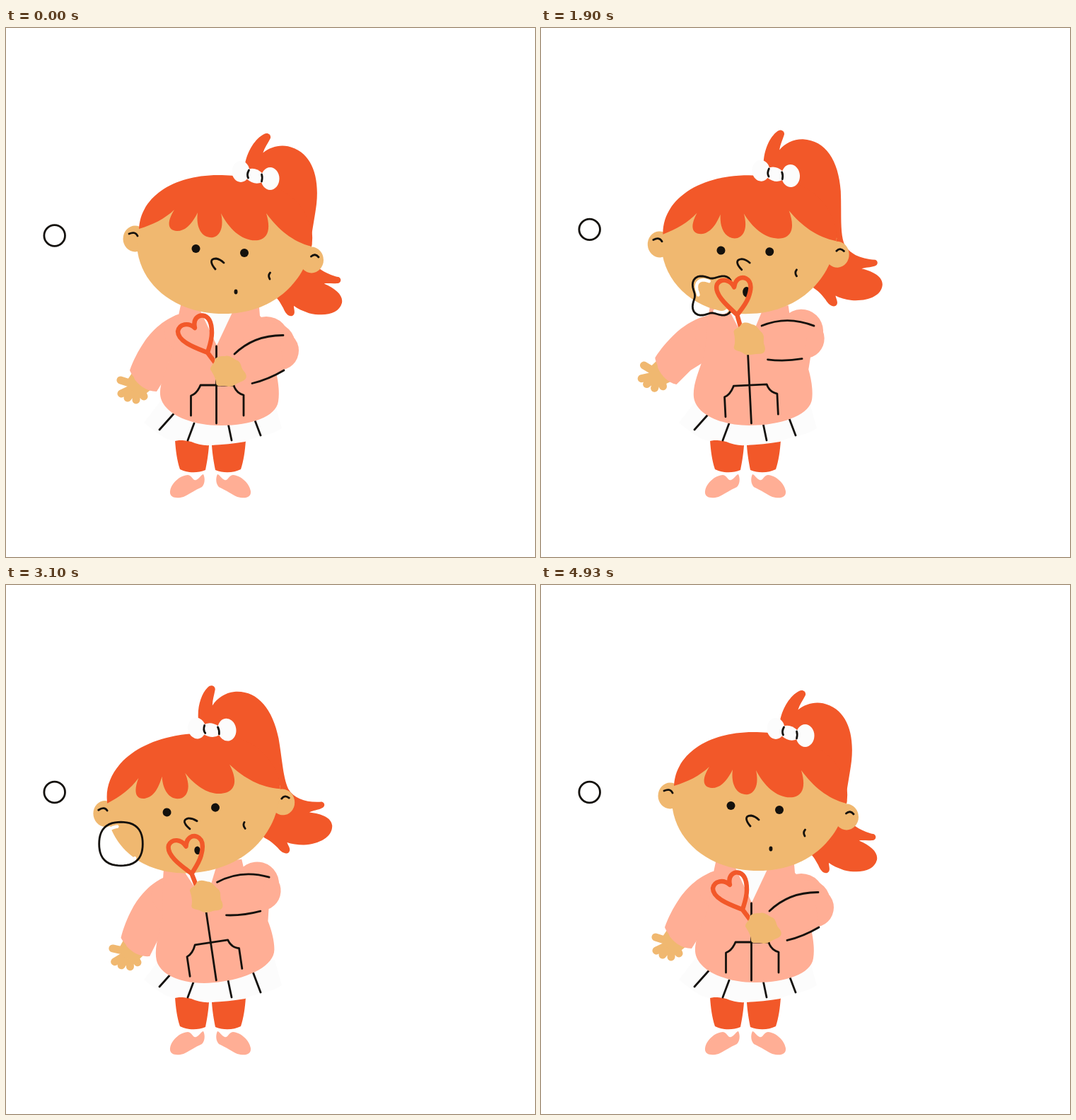
Animation of 748 by 748 pixels, one loop 5010 ms. Source, as an HTML page:

```html
<!DOCTYPE html>
<html lang="en">
<head>
<meta charset="utf-8">
<title>Girl blowing bubbles</title>
<style>
  html, body { margin: 0; width: 100%; height: 100%; overflow: hidden; background: #fff; }
  svg { display: block; width: 100%; height: 100%; }
  .hair { fill: #f25829; }
  .skin { fill: #f0b870; }
  .pink { fill: #ffae95; }
  .pale { fill: #fcfcfc; }
  .ink { fill: #14110d; }
  .line, .finger, .wand, .shine { fill: none; stroke-linecap: round; stroke-linejoin: round; }
  .line { stroke: #14110d; stroke-width: 2.8; }
  .finger { stroke: #f0b870; stroke-width: 11; }
  .wand { stroke: #f25829; stroke-width: 6.4; }
  .shine { stroke: #fff; stroke-width: 4.6; }
</style>
</head>
<body>
<svg viewBox="0 0 748 748">
  <circle id="dot" class="line" cx="68.7" r="14.8"/>

  <g id="leg">
    <path class="hair" d="M239 583C255 582 272 587 287 590C286 604 284 615 282 625C270 630 256 629 246 624C242 612 240 598 239 583Z"/>
    <path class="pink" d="M232 655C234 643 246 633 257 632C264 633 264 641 269 639C274 637 275 632 279 631C282 637 281 645 277 649C266 654 258 660 251 663C240 666 231 664 232 655Z"/>
  </g>
  <use href="#leg" transform="matrix(-1 0 0 1 578 0)"/>
  <path class="pale" d="M218 528L195 558C215 575 228 583 239 584Q252 581 262 585Q275 591 289 590Q315 589 338 585C352 577 372 578 390 566L380 530Z"/>
  <path class="line" d="M238 544.5L217 568M266 559L257 583M314 559L319 583M349 547L360 576"/>

  <path id="pony" class="hair" d="M313 192C313 172 321 154 331 146C337 141 343 146 341 151C339 158 336 164 335 172C343 162 355 156 368 156C400 157 419 185 423 228C425 256 423 284 429 301C436 316 452 323 474 324C479 326 478 332 473 333C468 335 460 335 455 337C473 341 485 348 485 359C484 375 465 383 442 382C433 381 425 379 419 376C420 381 424 386 420 390C416 393 410 390 405 382C398 373 394 370 388 366L350 320L313 230Z"/>

  <g id="body">
    <g id="arm">
      <path class="finger" d="M184 505L162 498M184 507L163 517M184 507L172 523M185 507L184 526M188 505L195 521"/>
      <path class="skin" d="M178 488L204 512L194 520L176 512L170 500Z"/>
      <path class="pink" d="M250 404C225 408 205 430 196 443C186 458 180 470 175 484C177 490 181 492 182 497C190 507 200 514 213 514L228 490L268 450Z"/>
    </g>
    <circle class="pink" cx="250" cy="430" r="26"/>
    <path class="pink" d="M247 392L358 395L359 407L392 440L382 487C385 500 387 515 385 528C382 550 345 562 305 562C262 563 220 545 218 518C217 500 228 480 236 458L244 406Z"/>
    <circle class="pink" cx="368" cy="441" r="33"/>
    <path class="pale" d="M274 398L322 398L298 449Z"/>
    <path class="line" d="M297.5 450V559M261.5 548V520Q270 517 275 505H322Q325 516 336 519V548"/>
  </g>

  <g id="head">
    <ellipse class="skin" cx="182.5" cy="298" rx="17" ry="18.5"/>
    <ellipse class="skin" cx="432" cy="328" rx="17" ry="18.5"/>
    <path class="skin" d="M187 283C174 345 224 404 308 404C375 404 422 362 433 305L400 250L230 240Z"/>
    <path class="hair" d="M188 284C190 240 235 208 300 208C330 208 345 213 365 218C400 230 420 250 427 272C434 285 434 298 432 309C405 302 385 285 368 262C374 282 372 297 357 300C335 303 316 285 304 262C308 280 304 293 293 296C278 298 268 284 271 261C264 275 255 287 242 287C227 286 228 273 238 257C224 270 208 278 188 284Z"/>
    <g class="ink">
      <circle cx="268.5" cy="312" r="6"/>
      <circle cx="337" cy="318" r="6"/>
      <ellipse id="mouth" cy="373"/>
    </g>
    <path class="line" d="M296 341C290 334 287 326 297 326Q303 327 308 332M373.500 346Q370 350 373 355M174 291Q183 287 186 294M431.500 323Q437 318 442 324"/>
    <g class="pale">
      <ellipse cx="332" cy="203" rx="12.500" ry="15"/>
      <path d="M342 200Q353 196 363 206L362 218Q351 223 340 213Z"/>
      <ellipse cx="373.500" cy="213" rx="13" ry="16"/>
    </g>
    <path class="line" d="M343.500 201Q340 207 342.500 212M361.500 207Q363 211 361.500 217"/>
  </g>

  <g id="bubble">
    <path id="shine" class="shine"/>
    <path id="film" class="line"/>
  </g>

  <g id="fore">
    <circle class="pink" cx="378" cy="448" r="31"/>
    <circle class="pink" cx="386" cy="456" r="28"/>
    <path class="pink" d="M328 462Q350 437 386 432L393 484L347 503L330 494Z"/>
    <path class="line" d="M323 461Q351 434 392 434.500M348 502.500Q371 497 393 484"/>
    <path class="wand" d="M297 475L285 459C270 453 243 444 243 429C245 418 258 416 267 424C264 411 272 406 278 406.500C290 408 291 424 291 431C291 442 287 452 285 459"/>
    <path class="skin" d="M289 483C288 478 296 474 295 469C299 463 306 464 310 464C316 462 321 468 327 470C334 474 331 480 337 486C341 491 341 496 335 499C326 502 321 508 314 507C306 504 299 509 297 503C297 496 293 489 289 483Z"/>
  </g>
</svg>

<script>
const $ = id => document.getElementById(id);
const LOOP = 5010;

// Eases through [step, value] pairs; one step is about 50 ms.
const track = (...keys) => t => {
  const k = keys.findIndex(key => key[0] > t);
  if (k === 0) return keys[0][1];
  if (k < 0) return keys[keys.length - 1][1];
  const [t0, a] = keys[k - 1], [t1, b] = keys[k];
  return a + (b - a) * (1 - Math.cos(Math.PI * (t - t0) / (t1 - t0))) / 2;
};

// Lean back to breathe in, lean forward to blow, then stand up again.
const sway = track([2, 0], [21, 33], [50, -41], [66, -41], [96, 0]);
const armTurn = track([2, 0], [24, 26], [54, -3], [70, -8], [96, 0]);
const foreTurn = track([2, 0], [24, 25], [50, 18], [100, 0]);
const lipShift = track([2, 0], [38, -24], [68, -24], [100, 0]);
const lipSize = track([2, 2.5], [26, 8], [44, 4.8], [80, 4], [98, 2.5]);
const dotY = track([0, 293.5], [28, 281], [54, 293]);

// The bubble grows out of the wand from BLOW to FREE, then drifts off.
const BLOW = 22, FREE = 54, GONE = 95;
const driftX = track([FREE, 199], [70, 126], [GONE, 119]);
const driftY = track([FREE, 371], [70, 361], [GONE, 343]);
const shrink = track([FREE, 37.5], [70, 26], [GONE, 23.5]);

const turn = (deg, x, y) => `rotate(${deg} ${x} ${y})`;

function set(id, attrs) {
  for (const name in attrs) $(id).setAttribute(name, attrs[name]);
}

function drawBubble(t) {
  const shown = t > BLOW && t < GONE;
  $("bubble").style.display = shown ? "" : "none";
  if (!shown) return;

  const u = Math.min(1, (t - BLOW) / (FREE - BLOW));
  const x = u < 1 ? 300 - 101 * u ** .8 : driftX(t);
  const y = u < 1 ? 386 - 15 * u : driftY(t);
  const r = u < 1 ? 37.5 * u ** .35 : shrink(t);
  const wobble = .03 + .28 * (1 - u);
  const gap = 1.4 * (1 - u);

  const arc = (from, to, size) => {
    let d = "";
    for (let i = 0; i <= 48; i++) {
      const a = from + (to - from) * i / 48;
      const q = r * size * (1 - wobble * Math.cos(4 * a));
      d += `${i ? "L" : "M"}${x + q * Math.cos(a)} ${y + q * Math.sin(a)}`;
    }
    return d;
  };
  set("film", { d: arc(gap, 2 * Math.PI - gap, 1) });
  set("shine", { d: arc(3.2, 4.5, .8) + arc(.8, 1.4, .86) });
  $("film").style.strokeWidth = Math.min(2.8, 2.8 - (t - 74) * .11);
}

function draw(t) {
  const s = sway(t), speed = sway(t + .5) - sway(t - .5);
  const back = s > 0;
  const lean = s * .205, tilt = s * (back ? .36 : .26);
  const dip = s * s * .0018;

  const head = `translate(${s} ${dip}) ${turn(tilt, 302.7, 315)}`;
  const body = turn(lean, 297, 560);
  // The pony tail hangs from the bow and trails the head.
  const pony = s * (back ? 1 : .42) + speed + 11;

  set("head", { transform: head });
  set("body", { transform: body });
  set("pony", { transform: `${head} translate(352 209) rotate(${pony - tilt}) translate(-330 -206)` });
  set("arm", { transform: turn(armTurn(t) - lean, 258, 440) });
  set("fore", { transform: `${body} ${turn(foreTurn(t) - lean, 413, 432)}` });

  const lip = lipSize(t);
  set("mouth", { cx: 325 + lipShift(t), rx: lip, ry: lip * 1.25 + .3 });
  set("dot", { cy: dotY(t) });
  drawBubble(t);
}

// Steps alternate between 30 and 70 ms.
function tick() {
  const ms = performance.now() % LOOP;
  draw(Math.min(99, Math.floor(ms / 100) * 2 + (ms % 100 >= 30 ? 1 : 0)));
  requestAnimationFrame(tick);
}
tick();
</script>
</body>
</html>
```
